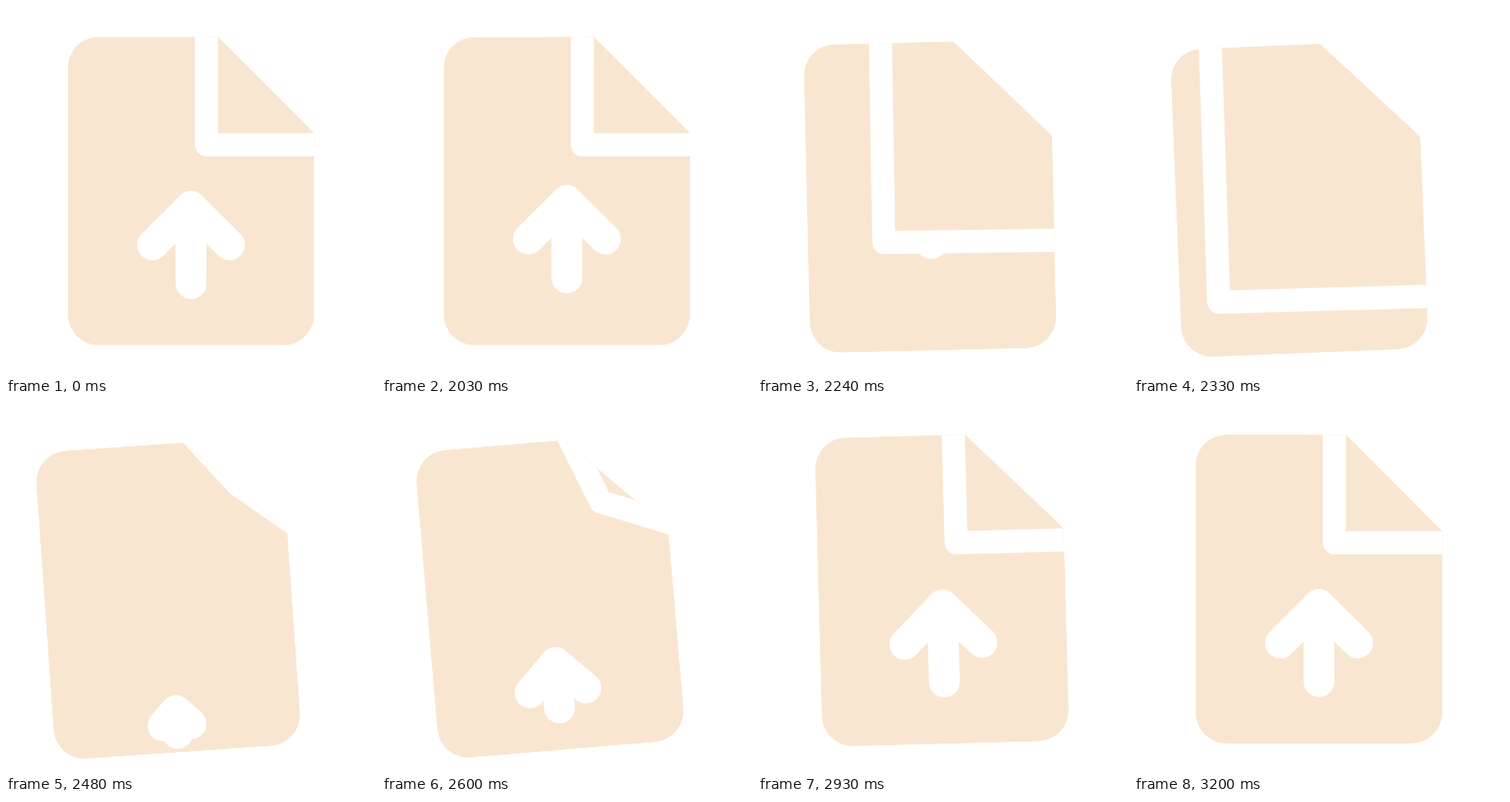
An HTML page that plays this animation: 400 px wide and 400 px high, repeating every 3230 ms.

```html
<!DOCTYPE html>
<html lang="en">
<head>
<meta charset="utf-8">
<title>File upload</title>
<style>
  html, body { margin: 0; width: 100%; height: 100%; overflow: hidden; background: #fff; }
  svg { display: block; width: 100%; height: 100%; }
  .paper { fill: #f9e6d1; }
  .line { stroke: #fff; stroke-linecap: round; stroke-linejoin: round; }
  .fold { stroke-width: 25; }
  .arrow { stroke-width: 33.33; fill: none; }
</style>
</head>
<body>
<svg viewBox="0 0 400 400">
  <defs>
    <path id="sheet" d="M229.17 33.33 L333.33 137.5 V333.33 A33.33 33.33 0 0 1 300 366.67 H100 A33.33 33.33 0 0 1 66.67 333.33 V66.67 A33.33 33.33 0 0 1 100 33.33 Z"/>
    <clipPath id="edge"><use href="#sheet"/></clipPath>
  </defs>
  <g id="page">
    <g clip-path="url(#edge)">
      <use href="#sheet" class="paper"/>
      <path id="arrowOut" class="line arrow"/>
      <path id="flapOut" class="line fold paper"/>
      <path id="arrowIn" class="line arrow"/>
      <path id="foldIn" class="line fold" fill="none"/>
    </g>
  </g>
</svg>
<script>
const LOOP = 3230, START = 2000, STEP = 30;
const page = document.getElementById('page');
const setPath = (id, d) => document.getElementById(id).setAttribute('d', d);

// Progress of step n from a to b, and its easings.
const ramp = (n, a, b) => Math.min(1, Math.max(0, (n - a) / (b - a)));
const sine = u => (1 - Math.cos(Math.PI * u)) / 2;
const out = (u, power) => 1 - (1 - u) ** power;
const mix = (a, b, u) => a + (b - a) * u;

const arrow = (tip, end, arm) =>
  `M${200 - arm} ${tip + arm} L200 ${tip} L${200 + arm} ${tip + arm} M200 ${tip} V${end}`;

// The sheet swings left and tilts, then settles back.
function movePage(n) {
  const dx = -25 * (sine(ramp(n, .4, 14.5)) - sine(out(ramp(n, 15, 39), 1.8)));
  const tilt = 5 * (sine(ramp(n, .5, 22.5)) - sine(ramp(n, 22.5, 36)));
  page.setAttribute('transform',
    `translate(${dx} ${-.41 * dx}) rotate(${-tilt} 200 200)`);
}

// The flap sweeps down over the sheet and covers the leaving arrow.
function sweepFlap(n) {
  const fall = 7.73 * Math.max(0, n - 1) ** 1.31;
  setPath('arrowOut', arrow(216.67 - 6.5 * n, 300 - 6.1 * n, 41.67));
  setPath('flapOut',
    `M${216.67 - .67 * fall} 0 L${216.67 - .685 * fall} ${150 + fall} L360 ${150 + 1.02 * fall} V0 Z`);
}

function raiseArrow(n) {
  const tip = mix(386, 216.67, out(ramp(n, 12, 30), 1.9));
  setPath('arrowIn', arrow(tip, tip + 83.33 * ramp(n, 12, 25.5), 41.67 * ramp(n, 12, 23)));
}

// The new crease bends inwards; its ends run on past the sheet.
function bendCorner(n) {
  const p = sine(ramp(n, 12, 31));
  const ax = mix(247, 216.67, p), by = mix(119.67, 150, p);
  const cx = mix(291.67, 216.67, p), cy = mix(75, 150, p);
  const beyond = (end, corner) => mix(corner, end, 1.5);
  setPath('foldIn',
    `M${beyond(ax, cx)} ${beyond(33.33, cy)} L${cx} ${cy} L${beyond(333.33, cx)} ${beyond(by, cy)}`);
}

const origin = performance.now();
function tick() {
  const t = Math.max(0, performance.now() - origin) % LOOP;
  const n = Math.min(40, Math.max(0, Math.floor((t - START) / STEP)));
  for (const part of [movePage, sweepFlap, raiseArrow, bendCorner]) part(n);
  requestAnimationFrame(tick);
}
tick();
</script>
</body>
</html>
```
